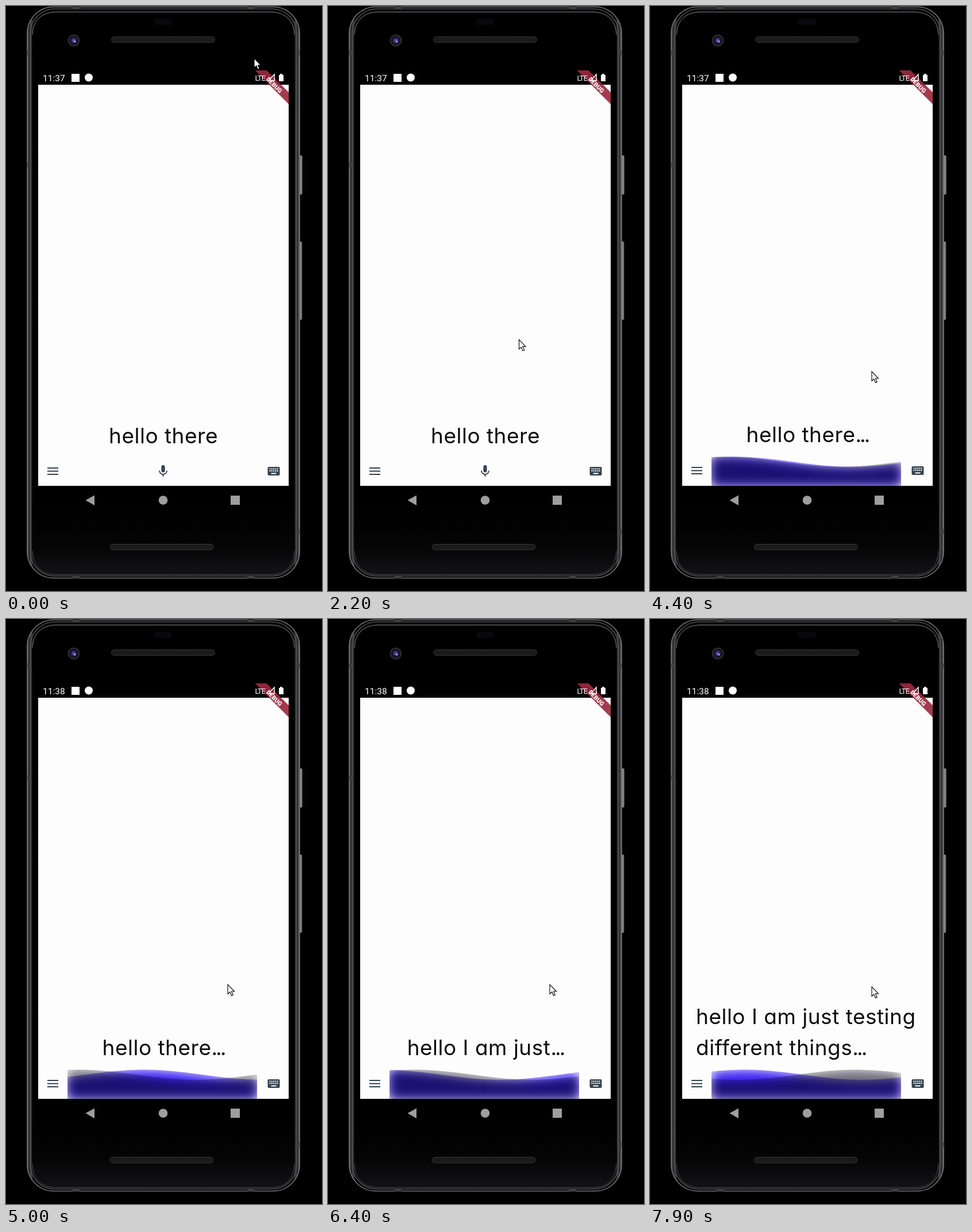
Write an HTML page that moves like this. It is 550x1018 px and loops after 8 s.

```html
<!DOCTYPE html>
<html lang="en">
<head>
<meta charset="utf-8">
<title>Voice input on a phone</title>
<style>
  html, body { margin: 0; width: 100%; height: 100%; overflow: hidden; background: #000; }
  svg { display: block; width: 100%; height: 100%; }
  .status { font: 400 15.5px Roboto, sans-serif; fill: #fff; }
  .speech { font: 400 37px Inter, sans-serif; font-feature-settings: "cv11"; letter-spacing: .5px; fill: #0c0c0c; }
  .dots { letter-spacing: -3px; }
  .debug { font: 900 10.5px Roboto, sans-serif; fill: #fff; text-anchor: middle; }
</style>
</head>
<body>
<svg viewBox="0 0 550 1018" xmlns="http://www.w3.org/2000/svg">
  <defs>
    <linearGradient id="frame">
      <stop offset="0" stop-color="#707074"/><stop offset=".007" stop-color="#222224"/>
      <stop offset=".014" stop-color="#48484b"/><stop offset=".022" stop-color="#050505"/>
      <stop offset=".978" stop-color="#050505"/><stop offset=".986" stop-color="#48484b"/>
      <stop offset=".993" stop-color="#222224"/><stop offset="1" stop-color="#808084"/>
    </linearGradient>
    <linearGradient id="chin" x2="0" y2="1">
      <stop offset="0" stop-color="#000"/><stop offset=".6" stop-color="#050506"/>
      <stop offset="1" stop-color="#131214"/>
    </linearGradient>
    <linearGradient id="key">
      <stop offset="0" stop-color="#222"/><stop offset=".6" stop-color="#97979a"/>
      <stop offset="1" stop-color="#4c4c4f"/>
    </linearGradient>
    <radialGradient id="lens">
      <stop offset="0" stop-color="#7d72e8"/><stop offset=".3" stop-color="#322c73"/>
      <stop offset=".6" stop-color="#12111f"/><stop offset=".75" stop-color="#15151a"/>
      <stop offset=".85" stop-color="#333338"/><stop offset="1" stop-color="#242428"/>
    </radialGradient>
    <pattern id="mesh" width="3" height="3" patternUnits="userSpaceOnUse">
      <rect width="3" height="3" fill="#141314"/><circle cx="1.5" cy="1.5" r=".9" fill="#2b292a"/>
    </pattern>
    <filter id="soft" filterUnits="userSpaceOnUse" x="60" y="740" width="424" height="140" color-interpolation-filters="sRGB">
      <feGaussianBlur stdDeviation="9.5"/>
      <feComposite in2="SourceAlpha" operator="in"/>
    </filter>
    <clipPath id="screen"><rect x="56" y="137" width="436" height="698"/></clipPath>
    <clipPath id="bar"><rect x="200" y="760" width="150" height="72"/></clipPath>
    <clipPath id="display"><rect x="56" y="112" width="436" height="723"/></clipPath>
  </defs>

  <rect width="550" height="1018"/>

  <!-- phone body -->
  <rect x="509" y="260" width="7" height="68" rx="2" fill="url(#key)"/>
  <rect x="509" y="410" width="6.5" height="136" rx="2" fill="url(#key)"/>
  <rect x="37" y="1.5" width="474" height="994" rx="46" fill="url(#frame)" stroke="#737376" stroke-width="1.6"/>
  <rect x="42" y="5" width="464" height="987" rx="43" fill="none" stroke="#4c4c4f" stroke-width="1.6"/>
  <rect x="45" y="10" width="458" height="980" rx="41" stroke="#1c1c1e"/>
  <path d="M46 870H502V949Q502 989 462 989H86Q46 989 46 949Z" fill="url(#chin)"/>
  <path d="M46 50Q48 12 86 10.500H462Q500 12 502 50" fill="none" stroke="#77777b"/>
  <path d="M46 948Q48 988 86 989.500H462Q500 988 502 948" fill="none" stroke="#48484b"/>
  <path d="M37 77h6v9h-6zM505 77h6v9h-6zM37 272h6v9h-6zM505 910h6v9h-6zM116 1h12v4h-12zM420 1h12v4h-12zM116 992h12v4h-12zM420 992h12v4h-12z" fill="#3f3f42"/>
  <rect x="257" y="22" width="32" height="11" rx="5" fill="#08080e"/>
  <circle cx="118" cy="60" r="10.500" fill="url(#lens)"/>
  <circle cx="120" cy="62" r="1.300" fill="#d5d0ff"/>
  <rect x="183.500" y="53.500" width="180" height="10" rx="5" fill="url(#mesh)" stroke="#343233"/>
  <rect x="181" y="936.500" width="180" height="10" rx="5" fill="url(#mesh)" stroke="#343233"/>

  <rect x="56" y="112" width="436" height="25"/>

  <!-- app -->
  <rect x="56" y="137" width="436" height="698" fill="#fefdfe"/>
  <g clip-path="url(#screen)">
    <circle id="ripple" cx="273.500" cy="809" r="37" fill="#f0f0f3" clip-path="url(#bar)"/>
    <text class="speech" id="line1"></text>
    <text class="speech" id="line2" x="80" y="759"></text>
    <g id="tools" fill="#33434f">
      <path d="M72 803h19v2h-19zM72 808.500h19v2h-19zM72 814h19v2h-19z"/>
      <rect x="455.500" y="802" width="21" height="15" rx="2"/>
      <path d="M458.500 805.500h15M458.500 809h15" stroke="#fff" stroke-width="2" stroke-dasharray="2 1.250"/>
      <path d="M461.500 813.500h9" stroke="#fff" stroke-width="2"/>
    </g>
    <g id="mic" fill="#33434f">
      <rect x="270.400" y="799" width="6.200" height="12.500" rx="3.100"/>
      <path d="M267 808.500a6.500 6.500 0 0 0 13 0M273.500 815v4" fill="none" stroke="#33434f" stroke-width="1.900"/>
    </g>
    <g id="waves">
      <path id="blue" fill="#3822f0" filter="url(#soft)"/>
      <path id="shade" fill="#06041a" opacity=".58" filter="url(#soft)"/>
      <g fill="none" stroke="#0d0838" stroke-opacity=".3">
        <ellipse id="pulse" cx="270.500" cy="816.500" ry="7"/>
        <path d="M270.500 812v9"/>
      </g>
    </g>
  </g>

  <!-- debug ribbon, below the status icons -->
  <g clip-path="url(#display)">
    <path d="M432 112H455L492 149V172Z" fill="#000" opacity=".16"/>
    <path d="M433.500 112H453.500L492 150.500V170.500Z" fill="#a02a40" opacity=".9"/>
    <text class="debug" transform="translate(467 137.500) rotate(45)" y="3.700">DEBUG</text>
  </g>

  <!-- status bar -->
  <text id="clock" class="status" x="64" y="130.500"></text>
  <rect x="114" y="118" width="14" height="14" fill="#fff"/>
  <circle cx="144" cy="124.500" r="7" fill="#fff"/>
  <text class="status" x="433.500" y="129.500" style="font-size:13px;letter-spacing:-1px">LTE</text>
  <path d="M457 130L467 119V130Z" fill="none" stroke="#fff" stroke-width="1.500"/>
  <path d="M475 120h2v-2h4v2h2v11h-8z" fill="#fff"/>

  <g fill="#9e9e9e">
    <path d="M138.500 860L154 851.500V869Z"/>
    <circle cx="273.500" cy="860" r="7.800"/>
    <rect x="391" y="852" width="16" height="16"/>
  </g>

  <path id="cursor" d="M0 0V16.500L3.800 13L6.500 19.500L9.200 18.300L6.500 12H11.500Z" fill="#fff" stroke="#000" stroke-width="1.100"/>
</svg>
<script>
const LOOP = 8000, LISTEN = 3700, MINUTE = 5000;
const $ = id => document.getElementById(id);
const set = (id, attrs) => { for (const k in attrs) $(id).setAttribute(k, attrs[k]); };
const show = (id, on) => { $(id).style.display = on ? "" : "none"; };

// [time, value, ...]
const pointer = [[0, 432, 91], [300, 434, 90], [800, 455, 64], [1500, 455, 64], [2500, 280, 802],
  [2950, 280, 802], [3200, 295, 778], [3900, 386, 636], [7300, 386, 636], [7500, 386, 640]];
const blueCrest = [[3700, 125], [4400, 145], [5600, 335], [6400, 505], [7900, 575]];
const shadeCrest = [[3700, 128], [5600, 125], [6400, 150], [7900, 358]];
const speech = [[0, "hello there"], [LISTEN, "hello there..."], [5300, "hello..."], [5800, "hello I am..."],
  [6200, "hello I am just..."], [6700, "hello I am just", "testing..."],
  [7000, "hello I am just testing", "different..."], [7500, "hello I am just testing", "different things..."]];

const clamp = x => Math.max(0, Math.min(1, x));

function at(keys, t) {
  const i = keys.findIndex(k => k[0] > t);
  if (i < 0) return keys[keys.length - 1].slice(1);
  if (!i) return keys[0].slice(1);
  const a = keys[i - 1], b = keys[i], u = (t - a[0]) / (b[0] - a[0]);
  return a.slice(1).map((v, j) => v + (b[j + 1] - v) * u);
}

function wave(crest) {
  let d = "M107 835";
  for (let x = 107; x <= 437; x += 5) {
    d += `L${x} ${(793 - 8.7 * Math.cos((x - crest) * 2 * Math.PI / 410)).toFixed(2)}`;
  }
  return d + "L437 835Z";
}

// the closing dots sit closer together than the letters
const write = (id, s) => { $(id).innerHTML = s.replace("...", '<tspan class="dots">...</tspan>'); };

function draw(t) {
  const listening = t >= LISTEN;
  const [, first, second = ""] = speech.filter(s => s[0] <= t).pop();
  $("clock").textContent = t < MINUTE ? "11:37" : "11:38";
  write("line1", first);
  write("line2", second);
  set("line1", {
    x: second ? 80 : 274,
    y: second ? 705 : listening ? 759 : 761,
    "text-anchor": second ? "start" : "middle"
  });
  set("tools", { transform: `translate(0 ${listening ? -1 : 0})` });

  show("mic", !listening);
  show("waves", listening);
  if (listening) {
    set("blue", { d: wave(at(blueCrest, t)[0]) });
    set("shade", { d: wave(at(shadeCrest, t)[0]) });
    set("pulse", { rx: 5.5 + 2.5 * Math.cos((t - 5600) * Math.PI / 800) });
  }

  show("ripple", t >= 2850 && !listening);
  set("ripple", { r: 12 + 25 * clamp((t - 2850) / 250), opacity: clamp((LISTEN - t) / 350) });

  const [x, y] = at(pointer, t);
  set("cursor", { transform: `translate(${x.toFixed(1)} ${y.toFixed(1)})` });
}

const start = performance.now();
function tick() {
  // the picture steps ten times a second
  draw(Math.floor((performance.now() - start) % LOOP / 100) * 100);
  requestAnimationFrame(tick);
}
draw(0);
requestAnimationFrame(tick);
</script>
</body>
</html>
```
